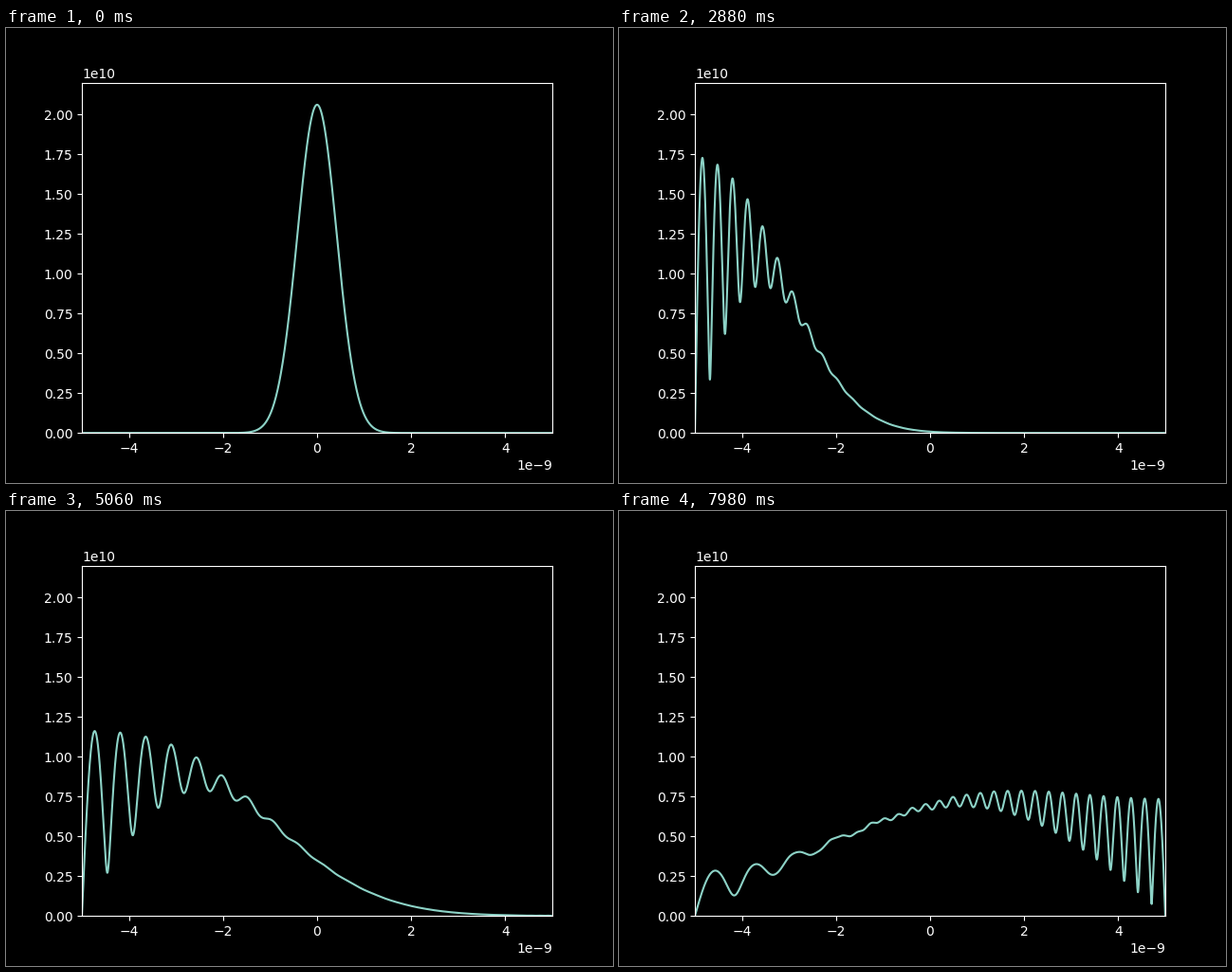
A matplotlib script that plays this animation: 640 px wide and 480 px high, repeating every 8000 ms.

```python
import numpy as np
import matplotlib.pyplot as plt
from matplotlib.animation import FuncAnimation

# Electron wave packet bouncing inside a box with hard walls
HBAR = 1.054571817e-34
MASS = 9.1093837e-31
HALF = 5e-9            # half width of the box, m
K0 = 8e9               # mean wave number, moving left
WIDTH = 1 / (0.3 * K0)
PEAK = 2.061e10
DT = 3e-17             # physical time per frame, s
FRAMES = 400
INTERVAL = 20

x = np.linspace(-HALF, HALF, 2001)


def free_packet(x, t):
    """Freely spreading Gaussian packet launched from x = 0."""
    drift = HBAR * t / MASS
    spread = 1 + 1j * drift / WIDTH**2
    phase = -1j * K0 * (x + K0 * drift / 2)
    bell = -(x + K0 * drift) ** 2 / (2 * WIDTH**2 * spread)
    return PEAK / np.sqrt(spread) * np.exp(bell + phase)


def box_packet(x, t):
    """Mirror images of the free packet make it vanish at both walls."""
    psi = 0
    for m in (-1, 0, 1):
        shift = 4 * HALF * m
        psi = psi + free_packet(x + shift, t)
        psi = psi - free_packet(shift - 2 * HALF - x, t)
    return psi


plt.style.use("dark_background")
fig, ax = plt.subplots(figsize=(6.4, 4.8), dpi=100)
ax.set_xlim(-HALF, HALF)
ax.set_ylim(0, 2.2e10)
line, = ax.plot(x, np.abs(box_packet(x, 0)))


def update(i):
    line.set_ydata(np.abs(box_packet(x, i * DT)))
    return line,


anim = FuncAnimation(fig, update, frames=FRAMES, interval=INTERVAL,
                     repeat=True, repeat_delay=0)
plt.show()
```
